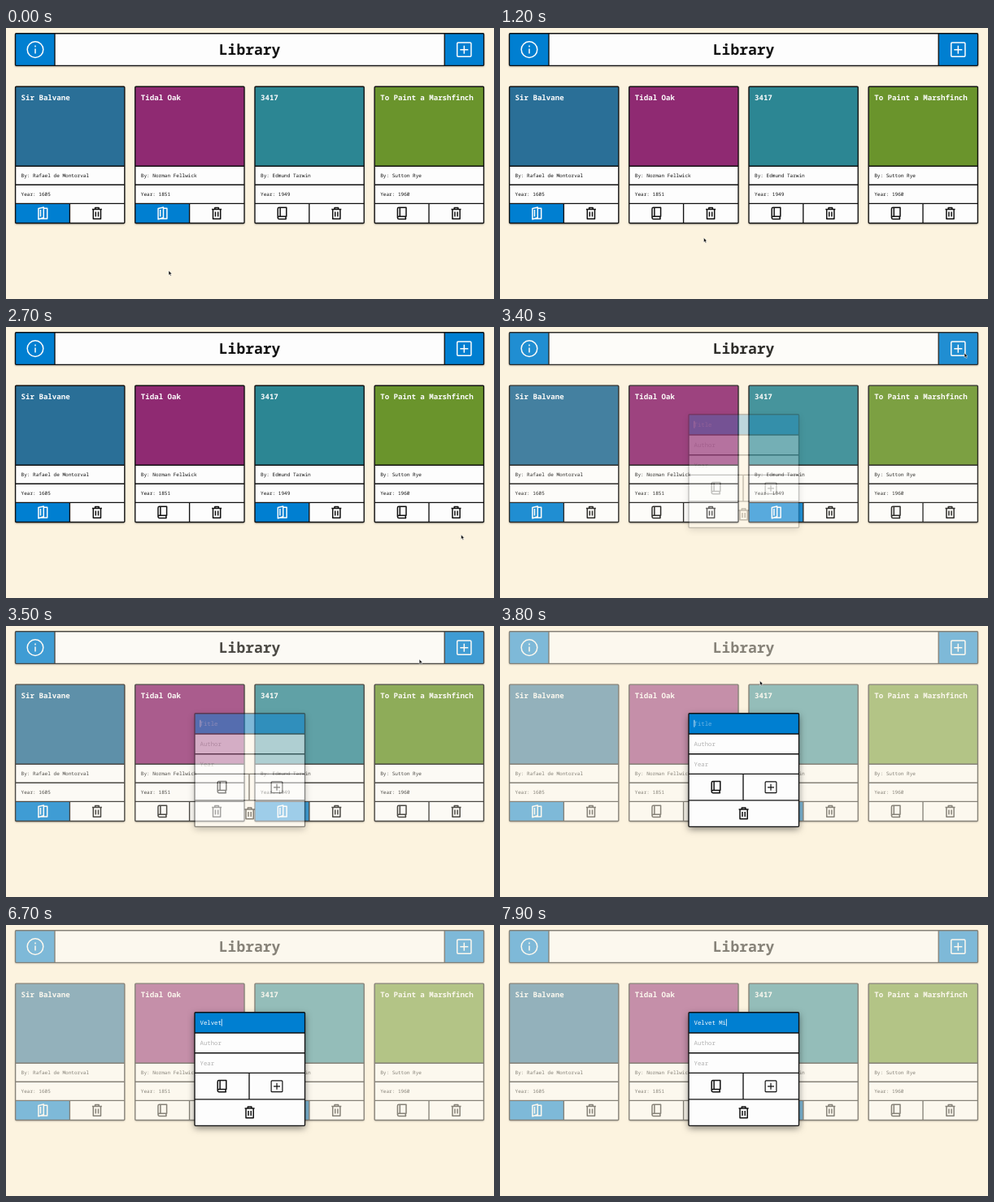
An HTML page for the animation above (8 s loop, 600 px wide and 334 px high).

```html
<!DOCTYPE html>
<html lang="en">
<head>
<meta charset="utf-8">
<title>Library</title>
<style>
  html, body { margin: 0; width: 100%; height: 100%; overflow: hidden; background: #fcf3df; }
  svg { display: block; width: 600px; height: 334px; }
  text { font-family: "Noto Sans Mono", "DejaVu Sans Mono", monospace; text-rendering: geometricPrecision; white-space: pre; }
  .line { fill: none; stroke: #111; stroke-width: 1.35; }
  .icon { fill: none; stroke-width: 1.5; stroke-linejoin: round; }
  .raised { filter: drop-shadow(0 1px 1.3px rgba(0, 0, 0, .5)); }
  .floating { filter: drop-shadow(0 3px 4px rgba(0, 0, 0, .5)); }
</style>
</head>
<body>
<svg id="stage" viewBox="0 0 600 334"></svg>
<script>
const LOOP = 8000, STEP = 100;
const BLUE = '#007fd1', INK = '#111', WHITE = '#fdfdfd';
const stage = document.getElementById('stage');

const books = [
  { title: 'Sir Balvane', author: 'Rafael de Montorval', year: 1605, color: '#2a6f97' },
  { title: 'Tidal Oak', author: 'Norman Fellwick', year: 1851, color: '#8f2a72' },
  { title: '3417', author: 'Edmund Tarwin', year: 1949, color: '#2c8693' },
  { title: 'To Paint a Marshfinch', author: 'Sutton Rye', year: 1960, color: '#6a942c' }
];

// Icons are drawn around their own centre.
const icons = {
  closed: 'M-5.3 5.3V-5.6Q-5.3-7.2-3.7-7.2H5.3V3.7H-3.7Q-5.3 3.7-5.3 5.3T-3.7 7H5.3M-2.4-7.2V3.7M5.3 3.7Q3.6 5.3 5.3 7',
  open: 'M-5.2-6L1.2-7.6V5.2L-5.2 7.2ZM1.2-6.2H5.6V6.5H-3M-2.6-4.5V4',
  trash: 'M-6-5H6M-2.3-5V-7H2.3V-5M-4.6-5V6.8H4.6V-5M-1.6-2V4M1.6-2V4',
  plus: 'M-7.4-8.6H7.4Q8.6-8.6 8.6-7.4V7.4Q8.6 8.6 7.4 8.6H-7.4Q-8.6 8.6-8.6 7.4V-7.4Q-8.6-8.6-7.4-8.6ZM0-5V5M-5 0H5',
  info: 'M-9.8 0A9.8 9.8 0 1 1 9.8 0A9.8 9.8 0 1 1-9.8 0M0-1V5M0-5V-3.2'
};

function add(parent, tag, attrs = {}, content = '') {
  const el = document.createElementNS('http://www.w3.org/2000/svg', tag);
  for (const key in attrs) el.setAttribute(key, attrs[key]);
  el.textContent = content;
  return parent.appendChild(el);
}
const rect = (parent, x, y, width, height, fill, cls = '') =>
  add(parent, 'rect', { x, y, width, height, fill, class: cls });
const lines = (parent, d) => add(parent, 'path', { d, class: 'line' });
const label = (parent, x, y, size, fill, content, weight = 400) =>
  add(parent, 'text', { x, y, 'font-size': size, fill, 'font-weight': weight }, content);
const icon = (parent, name, x, y, stroke = INK, scale = 1) =>
  add(parent, 'path', { d: icons[name], class: 'icon', stroke, transform: `translate(${x} ${y}) scale(${scale})` });
const frame = (parent, x, y, width, height) =>
  add(parent, 'rect', { x, y, width, height, rx: 1, class: 'line' });

const page = add(stage, 'g');

function buildHeader() {
  rect(page, 11.5, 6.7, 576, 39.6, WHITE, 'raised');
  rect(page, 11.5, 6.7, 48.5, 39.6, BLUE);
  rect(page, 539.2, 6.7, 48.3, 39.6, BLUE);
  lines(page, 'M60 6.7V46.3M539.2 6.7V46.3');
  frame(page, 11.5, 6.7, 576, 39.6);
  icon(page, 'info', 36, 26.6, WHITE);
  icon(page, 'plus', 563.3, 26.7, WHITE);
  label(page, 299.6, 32.7, 18, INK, 'Library', 700).setAttribute('text-anchor', 'middle');
}

function buildCard(book, i) {
  const card = add(page, 'g', { transform: `translate(${11.6 + 147.2 * i} 72.2)` });
  rect(card, 0, 0, 134.2, 168.3, WHITE, 'raised');
  rect(card, 0, 0, 134.2, 98, book.color);
  const fill = rect(card, 0, 144.2, 66.8, 24.1, BLUE);
  lines(card, 'M0 98H134.2M0 121H134.2M0 144.2H134.2M66.8 144.2V168.3');
  frame(card, 0, 0, 134.2, 168.3);
  label(card, 7, 17, 9.1, WHITE, book.title, 600);
  label(card, 7, 111.6, 6.05, INK, 'By: ' + book.author);
  label(card, 7, 134.6, 6.05, INK, 'Year: ' + book.year);
  const open = icon(card, 'open', 33.5, 156.3, WHITE);
  const closed = icon(card, 'closed', 33.5, 156.3);
  icon(card, 'trash', 100.3, 156.3);
  return read => {
    fill.style.display = open.style.display = read ? '' : 'none';
    closed.style.display = read ? 'none' : '';
  };
}

function buildForm() {
  const form = add(stage, 'g');
  rect(form, 232, 107.7, 135.5, 139.6, WHITE, 'floating');
  rect(form, 232, 107.7, 135.5, 25.3, BLUE);
  lines(form, 'M232 133H367.5M232 157.7H367.5M232 182.3H367.5M232 214.9H367.5M299 182.3V214.9');
  frame(form, 232, 107.7, 135.5, 139.6);
  label(form, 238.6, 147.9, 7.3, '#b0b0b0', 'Author');
  label(form, 238.6, 172.6, 7.3, '#b0b0b0', 'Year');
  icon(form, 'closed', 265.5, 198.8);
  icon(form, 'plus', 333, 198.8, INK, .8);
  icon(form, 'trash', 299.6, 231);
  return form;
}

buildHeader();
const setRead = books.map(buildCard);
const form = buildForm();
const field = label(form, 238.6, 123, 7.3, WHITE, '');
const caret = rect(form, 0, 115.8, .8, 8.8, WHITE);
const pointer = add(stage, 'path', {
  d: 'M0 0V5.6L1.3 4.5L2.2 6.6L3.2 6.1L2.3 4.1H4Z',
  fill: INK, stroke: '#fff', 'stroke-width': .5
});

// [time, x, y]
const path = [
  [0, 200, 299], [200, 200, 292], [500, 196, 230], [800, 197, 230], [1200, 250.5, 258.5],
  [1700, 340, 231], [2100, 342, 231], [2700, 559.5, 256], [3100, 571, 36], [3400, 571, 32],
  [3800, 319.5, 67.5], [4200, 292, 84], [4900, 292, 84]
];
const phrase = 'Velvet Mill';
const keys = [4900, 5200, 5500, 5800, 6100, 6500, 7000, 7400, 7800];
const openAt = 3300, fade = 400;

function pointerAt(t) {
  const i = path.findIndex(p => p[0] > t);
  const [t0, x0, y0] = path[i - 1], [t1, x1, y1] = path[i];
  const k = (t - t0) / (t1 - t0);
  return [x0 + (x1 - x0) * k, y0 + (y1 - y0) * k];
}

function draw(t) {
  const read = [true, t < 600, t >= 1900, false];
  setRead.forEach((set, i) => set(read[i]));

  const shown = Math.min(1, Math.max(0, (t - openAt) / fade));
  page.setAttribute('opacity', 1 - shown / 2);
  form.setAttribute('opacity', shown);

  const count = keys.filter(k => k <= t).length;
  field.textContent = count ? phrase.slice(0, count) : 'Title';
  field.setAttribute('fill', count ? WHITE : '#6fb5e3');
  caret.setAttribute('x', 238.5 + count * 4.38);
  const since = t - (count ? keys[count - 1] : openAt + 100);
  caret.style.display = since % 1000 < 500 ? '' : 'none';

  const visible = t < keys[0];
  pointer.style.display = visible ? '' : 'none';
  if (visible) pointer.setAttribute('transform', `translate(${pointerAt(t)})`);
}

const start = performance.now();
function tick() {
  const t = (performance.now() - start) % LOOP;
  draw(Math.floor(t / STEP) * STEP);
  requestAnimationFrame(tick);
}
draw(0);
requestAnimationFrame(tick);
</script>
</body>
</html>
```
